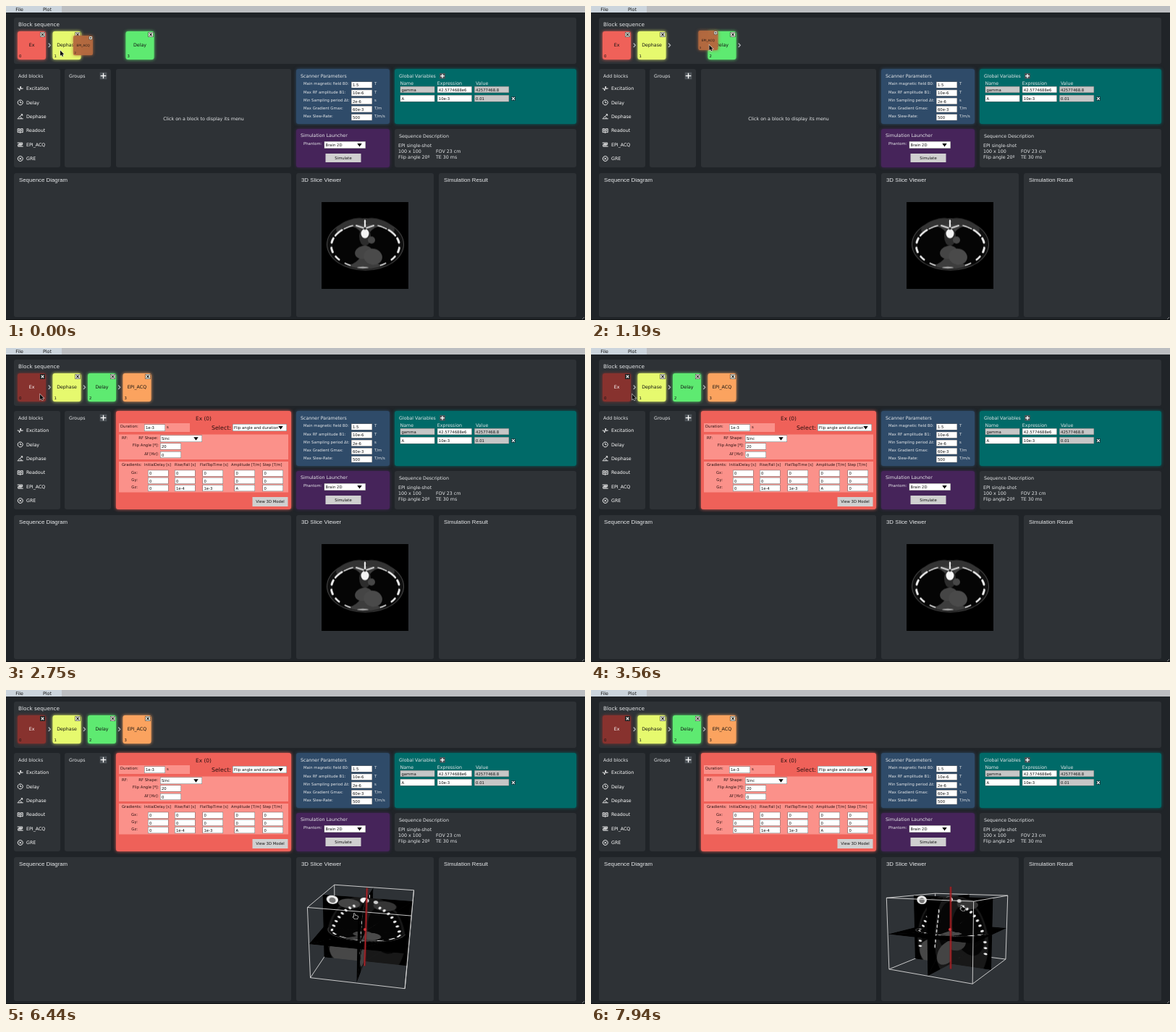
An HTML page with a canvas that plays this animation: 800 by 434 pixels, repeating every 8 s.

```html
<!DOCTYPE html>
<html lang="en">
<head>
<meta charset="utf-8">
<title>Sequence editor</title>
<style>
html, body { margin: 0; width: 100%; height: 100%; overflow: hidden; background: #202428; }
canvas { display: block; }
</style>
</head>
<body>
<canvas id="stage" width="800" height="434"></canvas>
<script>
const LOOP = 8000, REORDER = 1190, DROP = 1540, SELECT = 2540, ROTATE = 5950;
const PANEL = '#2e3236', INK = '#e6e8ea', RED = '#ef6159', LIGHT_RED = '#fb918a';
const ctx = document.getElementById('stage').getContext('2d');

// ---------- helpers ----------
// Each key is [time, ...values]; values ease between neighbouring keys.
function track(keys, t) {
  if (t <= keys[0][0]) return keys[0].slice(1);
  for (let i = 1; i < keys.length; i++) {
    const [a, b] = [keys[i - 1], keys[i]];
    if (t < b[0]) {
      const p = (t - a[0]) / (b[0] - a[0]), e = p * p * (3 - 2 * p);
      return a.slice(1).map((v, k) => v + (b[k + 1] - v) * e);
    }
  }
  return keys[keys.length - 1].slice(1);
}

function text(str, x, y, size = 6.3, color = INK, align = 'left', family = '"DejaVu Sans", sans-serif') {
  ctx.font = `${size}px ${family}`;
  ctx.fillStyle = color;
  ctx.textAlign = align;
  ctx.fillText(str, x, y + size * 0.36);
}

function rect(x1, y1, x2, y2, color) {
  ctx.fillStyle = color;
  ctx.fillRect(x1, y1, x2 - x1, y2 - y1);
}

function panel(x1, y1, x2, y2, color = PANEL) {
  ctx.save();
  ctx.shadowColor = color;
  ctx.shadowBlur = color === PANEL ? 0 : 4;
  ctx.fillStyle = color;
  ctx.beginPath();
  ctx.roundRect(x1, y1, x2 - x1, y2 - y1, 3);
  ctx.fill();
  ctx.restore();
}

function line(points, color, width = 1, target = ctx) {
  target.strokeStyle = color;
  target.lineWidth = width;
  target.beginPath();
  points.forEach(([x, y]) => target.lineTo(x, y));
  target.stroke();
}

function field(x1, y1, x2, y2, value, color = '#fff') {
  rect(x1, y1, x2, y2, '#6c6c6c');
  rect(x1 + .5, y1 + .5, x2 - .5, y2 - .5, color);
  text(value, x1 + 2, (y1 + y2) / 2 + .3, 5.3, '#111');
}

function dropdown(x1, y1, x2, y2, value) {
  field(x1, y1, x2, y2, value);
  const x = x2 - 8.5, y = (y1 + y2) / 2;
  ctx.fillStyle = '#000';
  ctx.beginPath();
  ctx.moveTo(x - 3.2, y - 2); ctx.lineTo(x + 3.2, y - 2); ctx.lineTo(x, y + 2.5);
  ctx.fill();
}

function button(x1, y1, x2, y2, label) {
  rect(x1, y1, x2, y2, '#d0d0d0');
  text(label, (x1 + x2) / 2, (y1 + y2) / 2, 5.3, '#111', 'center');
}

function plus(x, y, r) {
  rect(x - r, y - r, x + r, y + r, '#4d5358');
  line([[x - r + 1, y], [x + r - 1, y]], '#fff', 1.3);
  line([[x, y - r + 1], [x, y + r - 1]], '#fff', 1.3);
}

function cross(x, y, r, back, ink) {
  rect(x - r, y - r, x + r, y + r, back);
  const c = r - 1.2;
  line([[x - c, y - c], [x + c, y + c]], ink, 1.1);
  line([[x - c, y + c], [x + c, y - c]], ink, 1.1);
}

// ---------- block row ----------
function block(x, y, name, index, color, ink = '#111', size = 39) {
  ctx.save();
  ctx.translate(x, y);
  ctx.scale(size / 39, size / 39);
  panel(0, 0, 39, 39, color);
  text(name, 19.5, 19, 6.3, ink, 'center');
  text(index, 2, 34.5, 5.3, ink === '#fff' ? '#111' : ink);
  rect(31, 1, 38, 8, '#222');
  cross(34.5, 4.5, 3, ink === '#fff' ? '#222' : '#f2f4e8', ink === '#fff' ? '#fff' : '#222');
  ctx.restore();
}

const slot = i => 16 + 48.5 * i;
const arrow = x => line([[x - 1.3, 51.5], [x + 1.3, 54.3], [x - 1.3, 57]], '#aeb2b5', 1.3);

function drawBlocks(t) {
  const selected = t >= SELECT, dropped = t >= DROP, reordered = t >= REORDER - 15;
  block(slot(0), 35, 'Ex', 0, selected ? '#87322e' : RED, selected ? '#fff' : '#111');
  block(slot(1), 35, 'Dephase', 1, '#e6f96e');
  const [delayX] = track([[0, 165.5], [500, 161.5], [REORDER, 161.5], [DROP, slot(2)]], t);
  block(delayX, 35, 'Delay', reordered ? 2 : 3, '#5eea71');
  arrow(60);
  arrow(108.3);
  if (reordered) arrow(delayX + 43.5);
  if (dropped) {
    block(slot(3), 35, 'EPI_ACQ', 3, selected ? '#fba35f' : '#8d573e', selected ? '#111' : '#fff');
  } else {
    const [x, y] = track([[0, 93, 41], [500, 92, 39], [1150, 148, 34], [DROP, 160, 36]], t);
    ctx.globalAlpha = .9;
    block(x, y, 'EPI_ACQ', reordered ? 3 : 2, '#b4693f', '#111', 27);
    ctx.globalAlpha = 1;
  }
}

// ---------- fixed panels ----------
const ICONS = ['M0 4H2L3 7L4.5 1L5.5 5L6 4H8', 'M4 .5A3.5 3.5 0 1 0 4.1 .5M4 2V4.3H5.8',
  'M0 7H8M1 6L7 1M5 1H7V3M4 5L6 6', 'M4 2V7Q2 6 .5 6.5V1.5Q2 1 4 2Q6 1 7.5 1.5V6.5Q6 6 4 7M1.5 3H3M5 3H6.5M1.5 4.5H3M5 4.5H6.5',
  'M0 1.5H7V4H1V6.5H8M2 2.7H6M2 5.3H6', 'M4 .5A3.5 3.5 0 1 0 4.1 .5M2.5 2.5L5.5 5.5M5.5 2.5L2.5 5.5'].map(d => new Path2D(d));

function drawPanels() {
  rect(0, 0, 800, 434, '#202428');
  rect(0, 0, 800, 9, '#bcbec1');
  rect(0, 0, 77, 9, '#ccd5dd');
  text('File', 18.5, 4.3, 6.3, '#111', 'center');
  text('Plot', 57, 4.3, 6.3, '#111', 'center');
  rect(0, 433, 800, 434, '#111315');
  line([[796, 433], [799, 430]], '#999', .8);

  panel(11, 16, 788, 80);
  text('Block sequence', 17, 25.5, 7.27);

  panel(11, 87, 75, 223);
  text('Add blocks', 17, 96.5);
  ['Excitation', 'Delay', 'Dephase', 'Readout', 'EPI_ACQ', 'GRE'].forEach((name, i) => {
    const y = 114 + i * 19.4;
    ctx.save();
    ctx.translate(15.7, y - 4);
    ctx.strokeStyle = '#fff';
    ctx.lineWidth = .9;
    ctx.stroke(ICONS[i]);
    ctx.restore();
    text(name, 28, y, 6.3, '#fff');
  });
  panel(81, 87, 145, 223);
  text('Groups', 87, 96.5);
  plus(134.5, 96.5, 4.8);

  panel(401, 87, 530, 163, '#2f4b69');
  text('Scanner Parameters', 407, 97);
  [['Main magnetic field B0:', '1.5', 'T'], ['Max RF amplitude B1:', '10e-6', 'T'],
   ['Min Sampling period Δt:', '2e-6', 's'], ['Max Gradient Gmax:', '60e-3', 'T/m'],
   ['Max Slew-Rate:', '500', 'T/m/s']].forEach(([label, value, unit], i) => {
    const y = 107.5 + i * 11.2;
    text(label, 411, y, 5.3);
    field(477, y - 3, 506, y + 6, value);
    text(unit, 509, y, 5.3);
  });

  panel(401, 170, 530, 223, '#46245a');
  text('Simulation Launcher', 407, 178.5);
  text('Phantom:', 411, 190, 5.3);
  dropdown(439.5, 187, 497, 197, 'Brain 2D');
  button(441.5, 204, 490.5, 216, 'Simulate');

  panel(537, 87, 788, 163, '#006a68');
  text('Global Variables', 543, 96.5);
  plus(603, 96.7, 3.8);
  [['Name', 'gamma', 'A'], ['Expression', '42.5774688e6', '10e-3'], ['Value', '42577468.8', '0.01']]
    .forEach(([head, first, second], i) => {
      const x = 544.5 + i * 51.3;
      text(head, i === 2 ? 649 : x, 106.3);
      field(x, 111, x + 48, 120, first, i === 1 ? '#fff' : '#c6c6c6');
      field(x, 123, x + 48, 132.5, second, i === 2 ? '#c6c6c6' : '#fff');
    });
  cross(701, 128, 3, '#123f44', '#fff');

  panel(537, 170, 788, 223);
  text('Sequence Description', 543, 180);
  ['EPI single-shot', '100 x 100', 'Flip angle 20º'].forEach((s, i) => text(s, 542, 192.3 + i * 8, 6.3));
  text('FOV 23 cm', 594, 200.3);
  text('TE 30 ms', 594, 208.3);

  [[11, 394, 'Sequence Diagram'], [401, 591, '3D Slice Viewer'], [598, 788, 'Simulation Result']]
    .forEach(([x1, x2, title]) => {
      panel(x1, 231, x2, 430);
      text(title, x1 + 7, 240, 7.85, INK, 'left', '"Liberation Sans", Arial, sans-serif');
    });
}

// ---------- block menu ----------
function drawMenu(open) {
  panel(152, 87, 394, 223, open ? RED : PANEL);
  if (!open) return text('Click on a block to display its menu', 273, 155.5, 6.3, INK, 'center');
  const label = (s, x, y, align, size = 5.3) => text(s, x, y, size, '#2b1010', align);
  label('Ex (0)', 273, 97, 'center', 7.4);
  rect(156, 104, 254, 116, LIGHT_RED);
  label('Duration:', 158, 108.5);
  field(191, 105.5, 220, 115, '1e-3');
  label('s', 222, 109);
  label('Select:', 284, 109.7, 'left', 7.9);
  dropdown(313, 105, 388, 115, 'Flip angle and duration');

  rect(156, 119.5, 390, 154, LIGHT_RED);
  label('RF:', 160, 124);
  label('RF Shape:', 210, 124.5, 'right');
  dropdown(213, 120.5, 271, 130, 'Sinc');
  label('Flip Angle [º]:', 211, 134.5, 'right');
  field(213, 131.5, 242, 140.5, '20');
  label('Δf [Hz]:', 211, 146, 'right');
  field(213, 143, 242, 152, '0');

  rect(156, 157, 390, 199.5, LIGHT_RED);
  label('Gradients:', 160, 160.7);
  [['InitialDelay [s]', 191, 196, 0], ['Rise/Fall [s]', 233, 233, '1e-4'], ['FlatTopTime [s]', 268, 271.5, '1e-3'],
   ['Amplitude [T/m]', 311, 315.5, 'A'], ['Step [T/m]', 354.5, 354.5, 0]].forEach(([head, hx, x, last]) => {
    label(head, hx, 160.7, 'left', 5.1);
    [0, 0, last].forEach((v, row) => field(x, 168.7 + row * 10.2, x + 28.5, 177.7 + row * 10.2, v));
  });
  ['Gx:', 'Gy:', 'Gz:'].forEach((s, i) => label(s, 182, 171.7 + i * 10.2, 'right'));
  button(340.5, 206, 389.5, 219, 'View 3D Model');
}

// ---------- scan slices, each 120 by 120 ----------
function texture(paint) {
  const canvas = document.createElement('canvas');
  canvas.width = canvas.height = 120;
  const g = canvas.getContext('2d');
  g.fillRect(0, 0, 120, 120);
  const oval = (x, y, rx, ry, color, turn = 0) => {
    g.fillStyle = color;
    g.beginPath();
    g.ellipse(x, y, rx, ry, turn, 0, 7);
    g.fill();
  };
  paint(g, oval);
  return canvas;
}

const axial = texture((g, oval) => {
  oval(60.5, 59, 53.5, 36, '#4a4a4a');
  oval(60.5, 59, 52.5, 35, '#101010');
  oval(40, 33, 21, 8, '#333', -.35);
  oval(81, 33, 21, 8, '#333', .35);
  oval(60.5, 62, 46, 31, '#3d3d3d');
  oval(37, 61, 22, 27, '#050505', .25);
  oval(84, 61, 22, 27, '#050505', -.25);
  oval(60, 48, 8, 13, '#2c2c2c');
  oval(69, 53, 5, 5, '#474747');
  oval(58, 70, 12, 9, '#454545', -.2);
  oval(71, 76, 13, 11, '#4a4a4a', .25);
  g.lineCap = 'round';
  g.strokeStyle = '#eee';
  const rib = (from, to, width) => {
    g.lineWidth = width;
    for (const side of [-1, 1]) {
      g.beginPath();
      for (let i = 0; i <= 8; i++) {
        const a = from + (to - from) * i / 8;
        g.lineTo(60.5 + side * 47 * Math.sin(a), 61 - 30 * Math.cos(a));
      }
      g.stroke();
    }
  };
  rib(.38, .68, 1.5); rib(.75, 1.08, 2.5); rib(1.22, 1.42, 3);
  rib(1.66, 1.86, 3); rib(2.08, 2.26, 2.6); rib(2.5, 2.68, 1.6);
  oval(60, 44, 5.5, 6.5, '#f4f4f4');
  line([[48, 33], [60, 37], [72, 33]], '#ddd', 2, g);
  line([[60, 26], [60, 38]], '#e6e6e6', 2.4, g);
  oval(60, 37, 1.8, 1.8, '#222');
  oval(57, 91, 8, 1.2, '#aaa');
});

const coronal = texture((g, oval) => {
  oval(60, 80, 55, 84, '#181818');
  oval(34, 57, 23, 44, '#050505', .15);
  oval(86, 57, 23, 44, '#050505', -.15);
  oval(36, 13, 15, 9, '#454545');
  oval(84, 13, 15, 9, '#353535');
  oval(32, 103, 24, 25, '#474747');
  oval(66, 78, 16, 17, '#383838');
  for (const side of [-1, 1]) for (let i = 0; i < 11; i++) {
    const a = .35 + i * .125;
    oval(60 + side * 51 * Math.sin(a), 92 - 80 * Math.cos(a), 1.8, 2.6, '#f0f0f0', side * a);
  }
  oval(13, 8, 8, 8, '#eee');
  oval(13, 9, 4.5, 5, '#777');
  oval(57, 5, 6, 5, '#fff');
  oval(72, 7, 3, 3, '#ccc');
});

const sagittal = texture((g, oval) => {
  oval(62, 65, 43, 75, '#181818');
  oval(54, 48, 27, 40, '#060606');
  oval(52, 96, 28, 20, '#444');
  for (let i = 0; i < 13; i++) {
    oval(87 + 8 * Math.sin(i / 4), 6 + i * 9, 4, 3, '#e2e2e2');
    if (i < 8) oval(30 - i * 1.5, 20 + i * 8, 1.6, 3, '#ccc');
  }
});

// ---------- 3D view ----------
const HALF_HEIGHT = .78, DISTANCE = 7, SCALE = 60.5;

function projector(t) {
  const [yaw, pitch, roll] = track([[ROTATE, 0, 90, 0], [6560, 10, 14, 2], [7000, 16, 12, 2.5], [7940, 28, 10, 0]], t)
    .map(a => a * Math.PI / 180);
  const [sy, cy, sp, cp, sr, cr] = [yaw, pitch, roll].flatMap(a => [Math.sin(a), Math.cos(a)]);
  return ([u, v, z]) => {
    const away = v * cy - u * sy, depth = away * cp - z * sp;
    const k = SCALE * DISTANCE / (DISTANCE + depth);
    const x = (u * cy + v * sy) * k, y = -(z * cp + away * sp) * k;
    return { x: 497 + x * cr - y * sr, y: 333 + x * sr + y * cr, depth };
  };
}

function triangle(image, corners, origin, ex, ey, sx, sy) {
  const mid = k => (corners[0][k] + corners[1][k] + corners[2][k]) / 3;
  const mx = mid('x'), my = mid('y');
  ctx.save();
  ctx.beginPath();
  for (const c of corners) {
    const r = Math.hypot(c.x - mx, c.y - my) || 1;
    ctx.lineTo(c.x + (c.x - mx) / r * .6, c.y + (c.y - my) / r * .6);
  }
  ctx.clip();
  ctx.transform(ex.x / 60, ex.y / 60, ey.x / 60, ey.y / 60, origin.x, origin.y);
  ctx.drawImage(image, -sx, -sy);
  ctx.restore();
}

function quarter(image, [a, b, c, d], sx, sy) {
  const minus = (p, q) => ({ x: p.x - q.x, y: p.y - q.y });
  triangle(image, [a, b, c], a, minus(b, a), minus(c, a), sx, sy);
  const ex = minus(d, c), ey = minus(d, b);
  triangle(image, [d, b, c], minus(minus(d, ex), ey), ex, ey, sx, sy);
}

function drawScan(t) {
  if (t < ROTATE) return ctx.drawImage(axial, 436, 270.5);
  const project = projector(t), items = [];
  const add = (points, draw) => items.push({ depth: points.reduce((s, p) => s + p.depth, 0) / points.length, draw });
  const edge = (p, q, color = '#dcdcdc', width = .9) => {
    const ends = [project(p), project(q)];
    add(ends, () => line(ends.map(e => [e.x, e.y]), color, width));
  };
  const planes = [[axial, (a, b) => [a, -b, 0]], [coronal, (a, b) => [a, 0, -b * HALF_HEIGHT]],
    [sagittal, (a, b) => [0, a, -b * HALF_HEIGHT]]];
  for (const [image, place] of planes) for (const i of [0, 1]) for (const j of [0, 1]) {
    const corners = [[0, 0], [1, 0], [0, 1], [1, 1]].map(([a, b]) => project(place(i + a - 1, j + b - 1)));
    add(corners, () => quarter(image, corners, i * 60, j * 60));
  }
  for (const a of [-1, 1]) for (const b of [-1, 1]) {
    const h = HALF_HEIGHT;
    edge([-1, a, b * h], [1, a, b * h]);
    edge([a, -1, b * h], [a, 1, b * h]);
    edge([a, b, -h], [a, b, h]);
  }
  items.sort((a, b) => b.depth - a.depth).forEach(item => item.draw());

  const top = project([0, 0, 1]), bottom = project([0, 0, -.9]), center = project([0, 0, 0]);
  const axis = [[top.x, top.y], [bottom.x, bottom.y]];
  line(axis, 'rgba(130, 20, 25, .55)', 3.5);
  line(axis, '#c4262b', 1);
  ctx.fillStyle = '#d0353a';
  ctx.beginPath();
  ctx.arc(center.x - 1, center.y - 2, 2, 0, 7);
  ctx.fill();
}

// ---------- pointer ----------
const ARROW = new Path2D('M0 0V7.2L1.7 5.7L2.9 8.3L4.1 7.7L3 5.2H5.2Z');
const HAND = new Path2D('M1.3 .8Q2.3 0 2.7 1.2L3.2 3.2L6.3 3.9Q7.2 4.2 6.9 5.4L6.3 8H2.8L.2 5.4Q.2 4.4 1.9 4.8Z');
const POINTER = [[0, 75, 61.5], [500, 106, 59], [1150, 163, 54], [DROP, 175, 56], [1860, 90, 64.5],
  [2200, 75, 65], [2500, 47, 64], [3250, 47, 64], [3540, 56.5, 64], [4065, 128, 78], [4880, 385, 205],
  [5520, 425, 312], [5720, 425, 312], [ROTATE, 472, 358], [6560, 480, 303], [7000, 477, 298], [7940, 510, 297]];

function drawPointer(t) {
  const [x, y] = track(POINTER, t), hand = t >= ROTATE, shape = hand ? HAND : ARROW;
  ctx.save();
  ctx.translate(x, y);
  ctx.lineWidth = 1.2;
  ctx.strokeStyle = hand ? '#eee' : 'rgba(235, 235, 235, .75)';
  ctx.stroke(shape);
  ctx.fillStyle = '#0b0b0b';
  ctx.fill(shape);
  ctx.restore();
}

function frame(now) {
  const t = now % LOOP;
  drawPanels();
  drawMenu(t >= SELECT);
  drawBlocks(t);
  drawScan(t);
  drawPointer(t);
  requestAnimationFrame(() => frame(performance.now() - start));
}
const start = performance.now();
frame(0);
</script>
</body>
</html>
```
